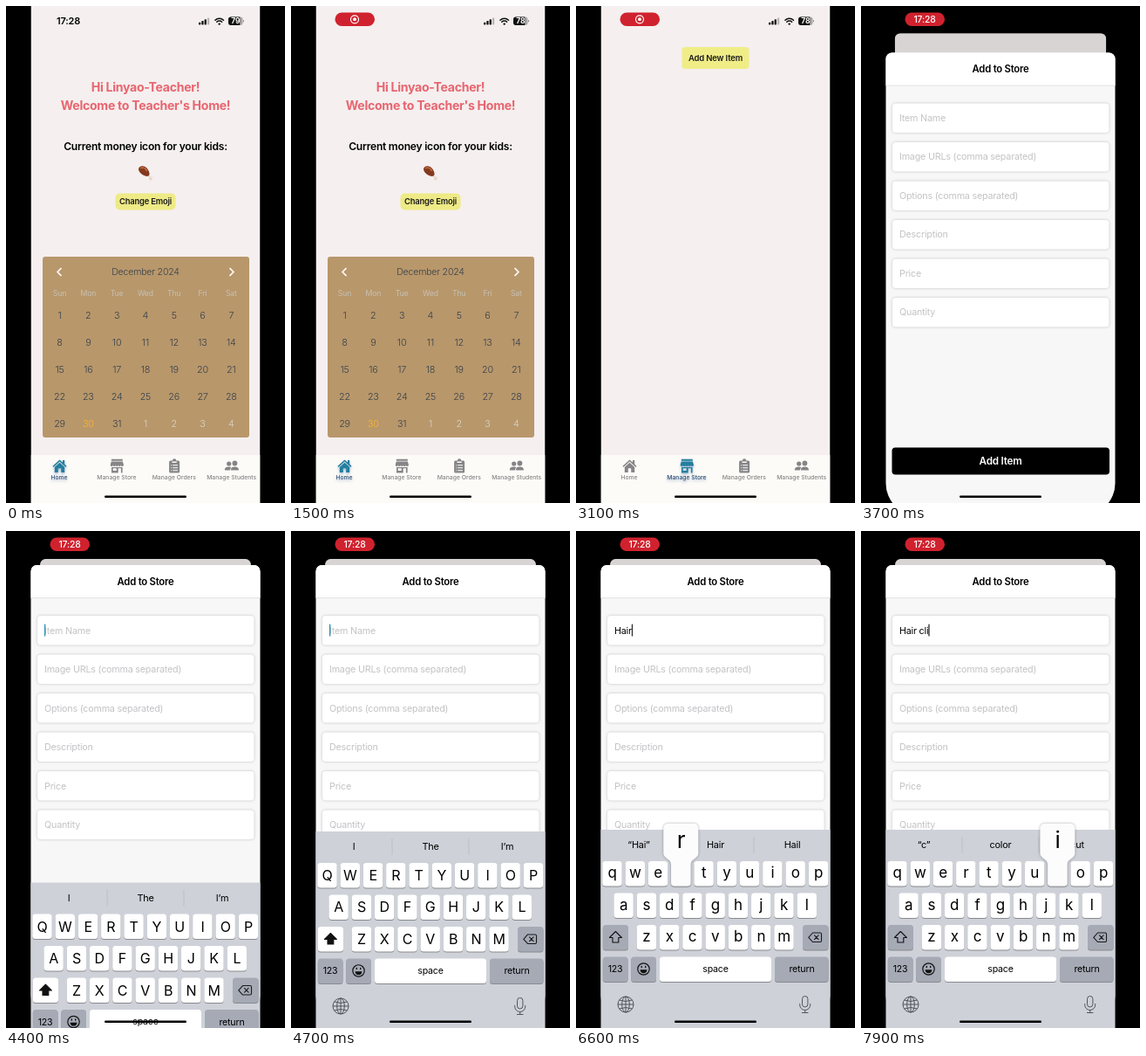
Write an HTML page that moves like this. It is 320 px wide and 569 px high and loops after 8 s.

```html
<!DOCTYPE html>
<html lang="en">
<head>
<meta charset="utf-8">
<title>Teacher app walkthrough</title>
<style>
  html, body { margin: 0; width: 100%; height: 100%; overflow: hidden; background: #000; }
  svg { display: block; width: 100%; height: 100%; }
  text { font-family: Inter, "Open Sans", sans-serif; letter-spacing: -.02em; white-space: pre; }
  .tab { color: #858587; }
  .tab.on { color: #237f9e; filter: drop-shadow(0 2.5px 1.5px #5878b080); }
  .tab.on text { fill: #2c4f78; }
  .tab text { letter-spacing: 0; }
  .field { filter: drop-shadow(0 .8px 1.6px #0000003a); }
  .key { filter: drop-shadow(0 1px 0 #888a8e); }
  #popup { filter: drop-shadow(0 .5px 1.5px #0005); }
</style>
</head>
<body>
<svg id="stage" viewBox="0 0 320 569" preserveAspectRatio="none"></svg>
<script>
const LOOP = 8000;
const INK = '#1a1a1c';

// Text placed by the middle of its capital letters.
const label = (x, y, str, size, { fill = '#000', weight = 400, anchor = 'middle', id = '' } = {}) =>
  `<text ${id && `id="${id}"`} x="${x}" y="${y + size * .36}" font-size="${size}" font-weight="${weight}" fill="${fill}" text-anchor="${anchor}">${str}</text>`;
const box = (x, y, w, h, r, fill, extra = '') =>
  `<rect x="${x}" y="${y}" width="${w}" height="${h}" rx="${r}" fill="${fill}" ${extra}/>`;
const line = (d, color, width, extra = '') =>
  `<path d="${d}" fill="none" stroke="${color}" stroke-width="${width}" stroke-linecap="round" stroke-linejoin="round" ${extra}/>`;
const repeat = (n, fn) => Array.from({ length: n }, (_, i) => fn(i)).join('');

// ---- home screen ----
function calendar() {
  const colX = i => 61.5 + i * 32.8;
  const days = ['Sun', 'Mon', 'Tue', 'Wed', 'Thu', 'Fri', 'Sat'];
  const dayColor = n => n > 31 ? '#dcd6cb' : n === 30 ? '#ffb52e' : '#36404a';
  return box(42, 287, 237, 207, 3, '#b8976b') +
    line('M63 300.5l-4 4 4 4M257 300.5l4 4-4 4', '#fff', 1.7) +
    label(160, 304, 'December 2024', 10.6, { fill: '#36404a', weight: 300 }) +
    days.map((d, i) => label(colX(i), 329, d, 8.7, { fill: '#c7c0b3' })).join('') +
    repeat(35, i => label(colX(i % 7), 354.3 + Math.floor(i / 7) * 31, i < 31 ? i + 1 : i - 30, 10.8,
      { fill: dayColor(i + 1), weight: 300 }));
}

function chickenLeg() {
  return line('M162 193l4 4', '#e9dccb', 2) +
    `<circle cx="167" cy="196.5" r="1.5" fill="#efe5d8"/><circle cx="165.6" cy="198" r="1.5" fill="#e3d4c2"/>
     <path d="M153 184.6c3-2.6 7.600-.8 9.800 2.600 1.700 2.700 2.200 5.200 1.400 6.600-.9 1.500-4 1.500-7-.2-4.600-2.500-6.500-6.900-4.200-9z" fill="#84391f"/>
     <path d="M154.500 185.500c2.500-1.300 5.500.3 7 3" fill="none" stroke="#b96a3c" stroke-width="1.600" stroke-linecap="round"/>`;
}

// ---- tab bar ----
const ICONS = {
  Home: `<path d="M-8 .2L0-7 3.500-3.900V-6.500H5.700V-1.900L8 .2 7 1.400 0-4.900-7 1.400z"/>
    <path d="M-5.700 1.400L0-3.700 5.700 1.400V7.600H1.700V2.800H-1.700V7.600H-5.700z"/>`,
  'Manage Store': `<path d="M-6.500-7.800H6.500V-5.800H-6.500zM-6.500-5H6.500L7.600-1.500H-7.600z"/>
    ${repeat(5, i => `<circle cx="${-6 + i * 3}" cy="-1" r="1.500"/>`)}
    <path fill-rule="evenodd" d="M-6.300 1.500H6.300V8H-6.300zM-4.600 2.800V5.500H-.6V2.800zM1.400 2.800V8H4.600V2.800z"/>`,
  'Manage Orders': `<path fill-rule="evenodd" d="M-4.500-6H-2.200A2.200 2.200 0 0 1 2.200-6H4.500Q6-6 6-4.500V6.500Q6 8 4.500 8H-4.500Q-6 8-6 6.500V-4.500Q-6-6-4.500-6zM-2.600-5V-3.500H2.600V-5z"/>
    ${line('M-3.500-.8h.1M-1.500-.8h5M-3.500 2.200h.1M-1.500 2.200h5M-3.500 5.200h.1M-1.500 5.200h5', '#fff', 1.1)}`,
  'Manage Students': `<circle cx="-3.200" cy="-2.500" r="2.600"/><circle cx="3.500" cy="-3" r="2.900"/>
    <path d="M-8 5V3.500Q-7.500.9-3.500.9-1.600.9-.5 1.700-2 3-2 5zM-1 5V4Q-.5 1 3.500 1T8 4V5z"/>`
};
const TAB_NAMES = Object.keys(ICONS);

const tabBar = () => box(28.500, 514, 263, 55, 0, '#fcfbf7') +
  TAB_NAMES.map((name, i) => `<g class="tab" fill="currentColor">
    <g transform="translate(${61.5 + i * 65.8} 526.500)">${ICONS[name]}</g>
    ${label(61 + i * 65.9, 539.5, name, 6.8, { fill: 'currentColor', weight: 500 })}</g>`).join('');

// ---- status bar ----
const statusIcons = () =>
  repeat(4, i => box(221 + i * 3.3, 18.8 - i * 1.8, 2.3, 2.7 + i * 1.8, .7, i < 3 ? '#111' : '#b8b4b4')) +
  line('M239.900 16.200a6.700 6.700 0 0 1 9.600 0', '#111', 1.5) +
  line('M241.800 18.300a4 4 0 0 1 5.800 0', '#111', 1.5) + '<circle cx="244.700" cy="20.600" r="1.200" fill="#111"/>' +
  box(255, 12.500, 16.500, 9.500, 3, '#aaa6a6') +
  '<path d="M258 12.500H268.200V22H258a3 3 0 0 1-3-3V15.500a3 3 0 0 1 3-3zM272.100 15.700q1.300 1.500 0 3z" fill="#111"/>' +
  label(263.3, 17.3, '79', 8.5, { fill: '#fff', weight: 700, id: 'battery' });

const recordPill = () => box(50.500, 7.500, 45.500, 15.500, 7.700, '#d0222e') +
  `<g id="recIcon"><circle cx="73" cy="15.300" r="4.500" fill="none" stroke="#fff" stroke-width="1.200"/>
   <circle cx="73" cy="15.300" r="2" fill="#fff"/></g>` +
  label(73, 15.3, '17:28', 10.4, { fill: '#fff', weight: 500, id: 'recTime' });

// ---- sheet, drawn with its top at y = 0 ----
const FIELDS = ['Item Name', 'Image URLs (comma separated)', 'Options (comma separated)', 'Description', 'Price', 'Quantity'];

function sheet() {
  const fieldRow = (name, i) => {
    const y = 58 + i * 44.5;
    return box(36, y, 248.5, 33.500, 4, '#fff', 'class="field"') +
      label(44, y + 16.700, name, 10.75, { fill: '#c3c3c6', anchor: 'start', id: i ? '' : 'hint' });
  };
  return `<path d="M28.500 7a7 7 0 0 1 7-7H284.500a7 7 0 0 1 7 7V493a37 37 0 0 1-37 37H65.500a37 37 0 0 1-37-37z" fill="#f7f7f7"/>
    <path d="M28.500 37.500V7a7 7 0 0 1 7-7H284.500a7 7 0 0 1 7 7V37.500z" fill="#fff"/>` +
    box(28.500, 37.300, 263, .8, 0, '#dcdcde') +
    label(160, 18.5, 'Add to Store', 11.3, { weight: 600 }) +
    FIELDS.map(fieldRow).join('') +
    label(44, 74.7, '', 10.75, { anchor: 'start', id: 'typed' }) +
    box(0, 67.500, 1.300, 14, .6, '#2b8fae', 'id="caret"') +
    box(35.500, 452, 249.500, 31, 4, '#000') +
    label(160, 467.7, 'Add Item', 11.7, { fill: '#fff', weight: 600 });
}

// ---- keyboard, drawn with its top at y = 0 ----
const ROWS = [['qwertyuiop', 41.5], ['asdfghjkl', 54.6], ['zxcvbnm', 80.9]];
const rowTop = r => 36 + r * 36.5;
const keys = ROWS.flatMap(([letters, x0], r) =>
  [...letters].map((char, i) => ({ char, x: x0 + i * 26.27, y: rowTop(r) })));
const keyCap = (x, y, w, fill, extra = '') => box(x, y, w, 28.5, 3.500, fill, `class="key" ${extra}`);

function keyboard() {
  const grey = '#a5aab5';
  const letters = (id, size, drop, map) => `<g id="${id}" font-size="${size}" text-anchor="middle">` +
    keys.map(k => `<text x="${k.x}" y="${k.y + drop}">${map(k.char)}</text>`).join('') + '</g>';
  const y3 = rowTop(2), y4 = rowTop(3);
  return box(28.500, 0, 263, 240, 0, '#ced1d8') +
    line('M116 8.500v18M204 8.500v18', '#b4b8c0', .7) +
    repeat(3, i => label(72 + i * 88, 17.5, '', 10.9, { id: 'guess' + i })) +
    keys.map(k => keyCap(k.x - 11.2, k.y, 22.4, '#fff')).join('') +
    letters('upper', 16, 20, c => c.toUpperCase()) + letters('lower', 17, 19, c => c) +
    keyCap(30.800, y3, 29.200, grey, 'id="shiftCap"') +
    `<path id="shiftArrow" d="M45.400 ${y3 + 7.5}l7 7h-3.600v5.500h-6.800v-5.500h-3.600z" stroke="#111" stroke-width="1.100" stroke-linejoin="round"/>` +
    keyCap(260, y3, 29.500, grey) +
    line(`M271.500 ${y3 + 9}h8.500q1.500 0 1.500 1.500v7.500q0 1.500-1.500 1.500h-8.500l-4.700-5.200zM273.500 ${y3 + 11.9}l4.600 4.700m0-4.700l-4.600 4.700`, INK, 1.1) +
    keyCap(30.800, y4, 28.700, grey) + label(45, y4 + 14, '123', 10.6) +
    keyCap(63.200, y4, 28.800, grey) +
    `<circle cx="77.500" cy="${y4 + 14}" r="6.700" fill="none" stroke="#111" stroke-width="1.200"/>
     <path d="M73.500 ${y4 + 14.7}h8q-.5 4-4 4t-4-4z" fill="#111"/>` +
    line(`M75.300 ${y4 + 11}v1M79.700 ${y4 + 11}v1`, '#111', 1.4) +
    keyCap(96, y4, 128, '#fff', 'id="spaceCap"') + label(160, y4 + 13.5, 'space', 10.6) +
    keyCap(228, y4, 61.500, grey) + label(259, y4 + 14, 'return', 10.7) +
    `<g fill="none" stroke="#50545b" stroke-width="1"><circle cx="57" cy="200" r="9"/>
     <ellipse cx="57" cy="200" rx="4.300" ry="9"/><path d="M48 200h18M57 191v18M49.700 195q7.300 3 14.600 0M49.700 205q7.300-3 14.600 0"/>
     <rect x="259.500" y="190.500" width="6.400" height="12.500" rx="3.200"/>
     <path d="M256.700 199v1.500a6 6 0 0 0 12 0V199M262.700 206.500v3M259 209.500h7.400"/></g>` +
    `<g id="popup"><path fill="#fcfcfd" d="M-20-38a5 5 0 0 1 5-5H15a5 5 0 0 1 5 5V-9C20-3 11.200-3 11.200 4V25a3.500 3.500 0 0 1-3.500 3.500H-7.700a3.500 3.500 0 0 1-3.500-3.500V4C-11.200-3-20-3-20-9z"/>
     <text id="popupChar" y="-15" font-size="26" text-anchor="middle"></text></g>`;
}

document.getElementById('stage').innerHTML = `
  <clipPath id="cardClip"><rect id="cardShape" x="28.500" width="263" height="569"/></clipPath>
  <rect width="320" height="569"/>
  <g id="card" clip-path="url(#cardClip)">
    ${box(28.500, 0, 263, 569, 0, '#f5efef')}
    <g id="home">
      ${label(160, 93, 'Hi Linyao-Teacher!', 14.1, { fill: '#e8656f', weight: 700 })}
      ${label(160, 114, "Welcome to Teacher's Home!", 14.1, { fill: '#e8656f', weight: 700 })}
      ${label(160, 160.3, 'Current money icon for your kids:', 12.1, { weight: 600 })}
      ${chickenLeg()}
      ${box(125.500, 214.500, 69, 19, 5, '#eeea85')}
      ${label(160, 224, 'Change Emoji', 9.4, { weight: 600, fill: INK })}
      ${calendar()}
    </g>
    <g id="store">${box(121.500, 47, 77, 25, 4, '#f0ed87')}
      ${label(160, 59.5, 'Add New Item', 9.5, { weight: 600, fill: INK })}</g>
    ${tabBar()}
    <rect id="dim" x="28" width="264" height="569"/>
  </g>
  <g id="status">${statusIcons()}</g>
  ${label(71.5, 17.2, '17:28', 11, { weight: 600, id: 'clock' })}
  <g id="pill">${recordPill()}</g>
  <g id="sheet">${sheet()}</g>
  <g id="keyboard">${keyboard()}</g>
  ${box(113, 560.500, 94, 2.600, 1.300, '#000')}`;

// ---- timeline ----
const T = { pill: 500, store: 2400, press: 3130, sheet: 3310, keys: 4215 };
const STROKES = [['H', 5300], ['a', 5850], ['i', 6150], ['r', 6500], [' ', 6800], ['c', 7050], ['l', 7500], ['i', 7850]];
const GUESSES = [
  [0, 'I', 'The', 'I’m'], [5720, '“H”', 'He', 'How'], [6000, '“Ha”', 'Have', 'Had'],
  [6300, '“Hai”', 'Hair', 'Hail'], [6650, '“Hair”', 'Hair', 'Hairs'],
  [6950, 'is', 'and', 'cut'], [7250, '“c”', 'color', 'cut']
];

const $ = Object.fromEntries([...document.querySelectorAll('[id]')].map(el => [el.id, el]));
const tabs = document.querySelectorAll('.tab');
const set = (el, name, value) => el.setAttribute(name, value);
const show = (el, visible) => set(el, 'visibility', visible ? 'visible' : 'hidden');
const clamp = v => Math.max(0, Math.min(1, v));
const spring = ms => {
  const k = Math.max(0, ms) * .014;
  return 1 - (1 + k) * Math.exp(-k);
};

function drawScreen(t) {
  const onStore = t >= T.store;
  show($.home, !onStore);
  show($.store, onStore);
  tabs.forEach((tab, i) => tab.classList.toggle('on', i === +onStore));
  set($.store, 'opacity', t > T.press && t < T.sheet ? .5 : 1);

  const grow = clamp((t - T.pill) / 200);
  set($.pill, 'transform', `translate(73 15.300) scale(${.6 + .4 * grow}) translate(-73 -15.300)`);
  set($.pill, 'opacity', grow);
  set($.clock, 'opacity', 1 - grow);
  $.battery.textContent = t < T.pill ? 79 : 78;
  const timeShown = t >= T.sheet + 150;
  show($.recIcon, !timeShown);
  show($.recTime, timeShown);
}

function drawSheet(t) {
  const p = spring(t - T.sheet);
  set($.card, 'transform', `translate(160 ${32 * p}) scale(${1 - .08 * p}) translate(-160 0)`);
  set($.cardShape, 'rx', 7 * clamp(p * 4));
  set($.dim, 'opacity', .115 * p);
  set($.status, 'opacity', 1 - clamp(p * 4));
  set($.sheet, 'transform', `translate(0 ${569 - 530 * p})`);
  show($.sheet, p > 0);
}

function drawTyping(t) {
  const typed = STROKES.filter(s => t >= s[1]).map(s => s[0]).join('');
  const focused = t >= T.keys;
  $.typed.textContent = typed;
  show($.hint, !typed);
  show($.caret, focused);
  set($.caret, 'x', typed ? 44 + $.typed.getComputedTextLength() : 44);
  set($.caret, 'fill', typed ? '#2a2a30' : '#2b8fae');

  set($.keyboard, 'transform', `translate(0 ${569 - 227 * spring(t - T.keys)})`);
  show($.upper, focused && !typed);
  show($.lower, focused && typed);
  set($.shiftCap, 'fill', typed ? '#a5aab5' : '#fff');
  set($.shiftArrow, 'fill', typed ? 'none' : '#111');

  const guess = GUESSES.filter(g => t >= g[0]).pop();
  [0, 1, 2].forEach(i => { $['guess' + i].textContent = guess[i + 1]; });

  const pressed = STROKES.find(([, at]) => t >= at - 70 && t < at + 150);
  const key = pressed && keys.find(k => k.char === pressed[0].toLowerCase());
  show($.popup, key);
  set($.spaceCap, 'fill', pressed && pressed[0] === ' ' ? '#a5aab5' : '#fff');
  if (key) {
    set($.popup, 'transform', `translate(${key.x} ${key.y})`);
    $.popupChar.textContent = pressed[0];
  }
}

const start = performance.now();
function frame() {
  const t = (performance.now() - start) % LOOP;
  drawScreen(t);
  drawSheet(t);
  drawTyping(t);
  requestAnimationFrame(frame);
}
frame();
</script>
</body>
</html>
```
